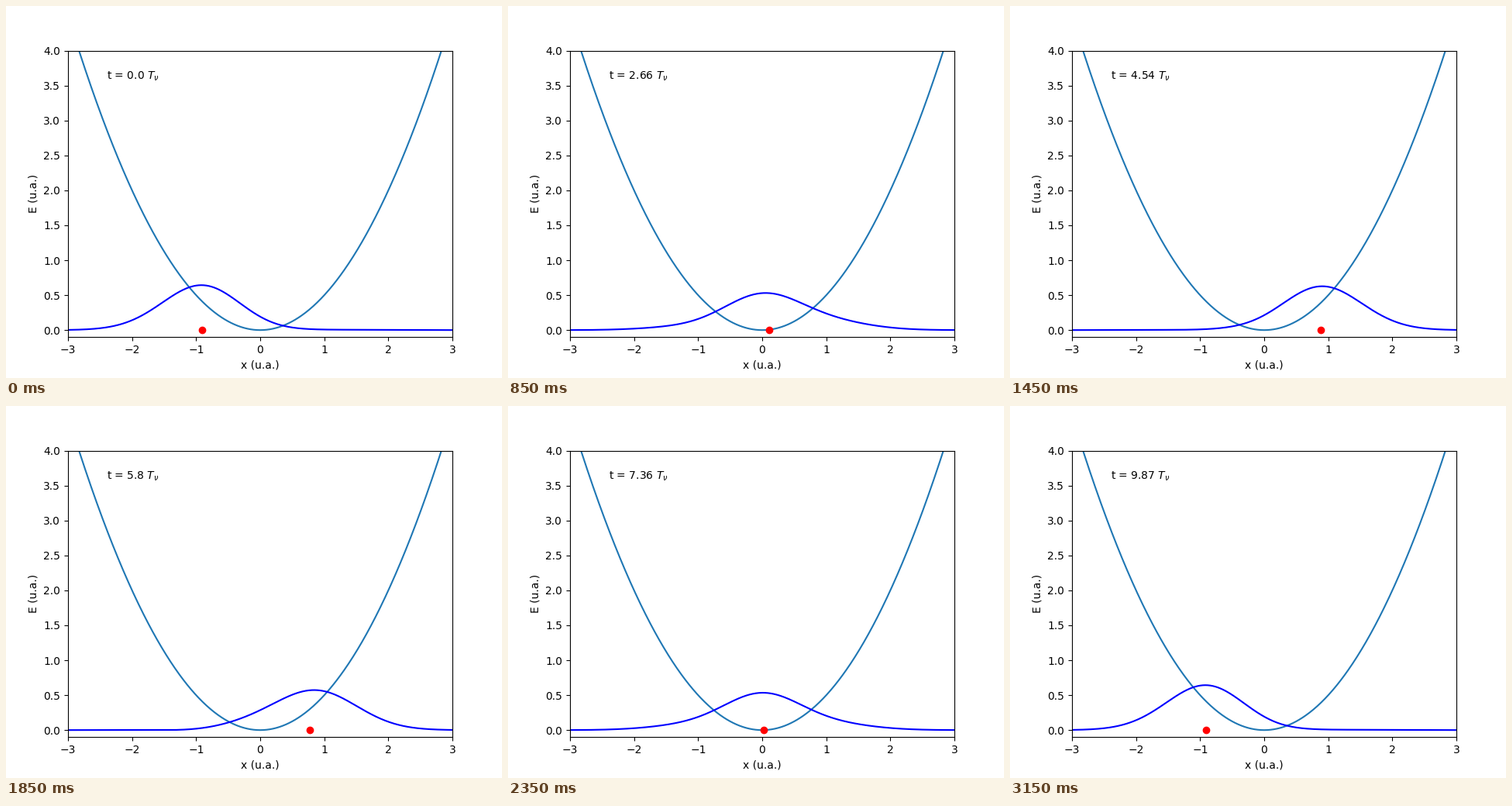
Animation, 640 px wide and 480 px high, one loop 3200 ms. Source, as a matplotlib script:

```python
import numpy as np
import matplotlib.pyplot as plt
from matplotlib.animation import FuncAnimation

FRAMES = 64
INTERVAL = 50

# Coherent state of the harmonic oscillator, cut off after n = 2
ALPHA = -1 / np.sqrt(2)
C = np.exp(-ALPHA**2 / 2) * np.array([1, ALPHA, ALPHA**2 / np.sqrt(2)])

x = np.linspace(-3, 3, 601)
ground = np.pi**-0.25 * np.exp(-x**2 / 2)
PHI = ground * np.array([np.ones_like(x),
                         np.sqrt(2) * x,
                         (2 * x**2 - 1) / np.sqrt(2)])
X_AMP = np.sqrt(2) * (C[0] * C[1] + np.sqrt(2) * C[1] * C[2])


def density(t):
    phases = np.exp(-1j * np.arange(3) * t)
    return np.abs((C * phases) @ PHI)**2


fig, ax = plt.subplots(figsize=(6.4, 4.8), dpi=100)
ax.plot(x, x**2 / 2)
wave, = ax.plot([], [], "b")
dot, = ax.plot([], [], "ro")
label = ax.text(0.1, 0.9, "", transform=ax.transAxes)
ax.set_xlim(-3, 3)
ax.set_ylim(-0.1, 4)
ax.set_xlabel("x (u.a.)")
ax.set_ylabel("E (u.a.)")


def update(i):
    t = 2 * np.pi * i / (FRAMES - 1)
    wave.set_data(x, density(t))
    dot.set_data([X_AMP * np.cos(t)], [0])
    label.set_text(f"t = {round(float(t * np.pi / 2), 2)} " + r"$T_\nu$")
    return wave, dot, label


anim = FuncAnimation(fig, update, frames=FRAMES, interval=INTERVAL,
                     repeat=True, repeat_delay=0)
plt.show()
```
